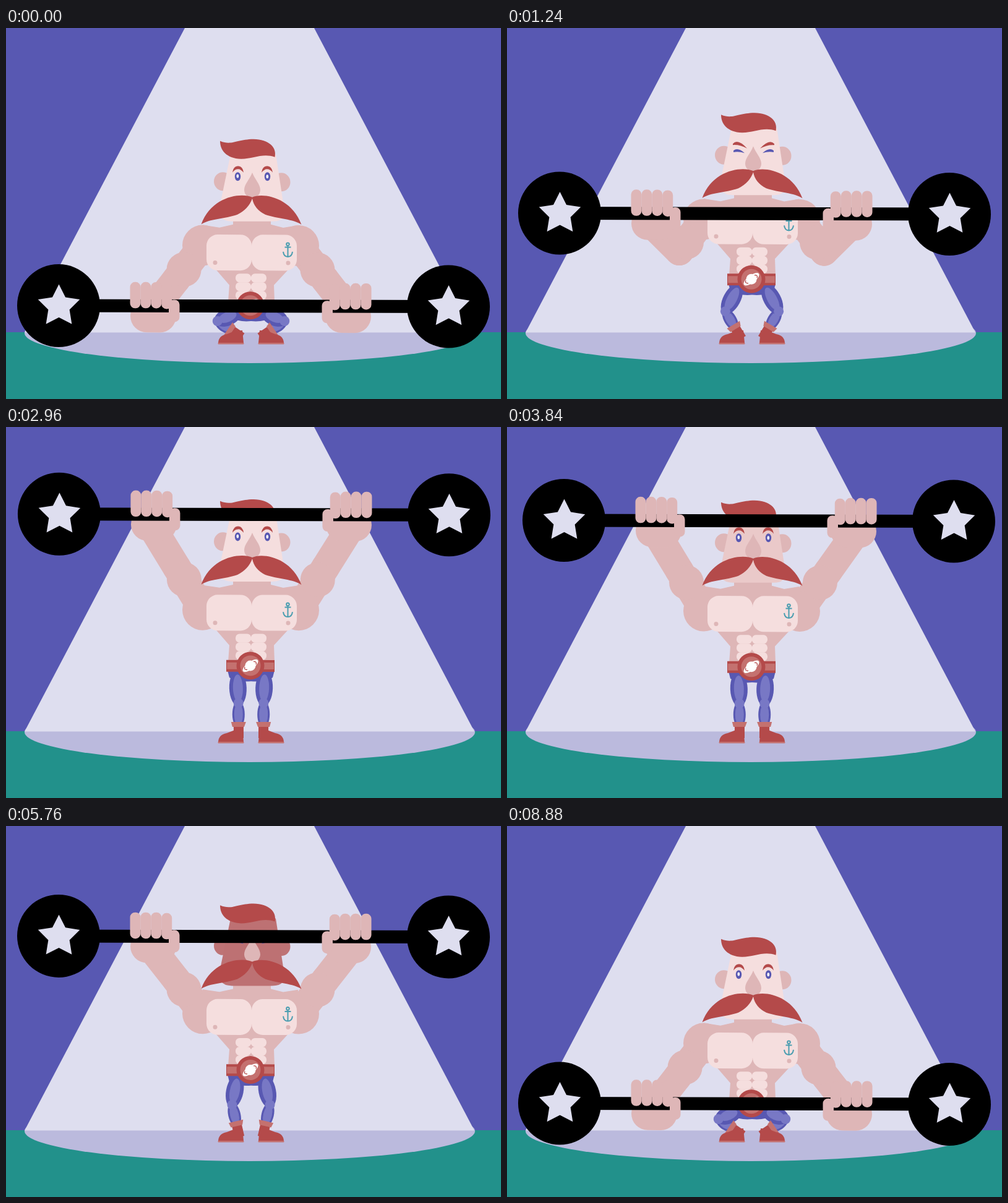
An HTML page with a canvas that plays this animation: 800 px wide and 600 px high, repeating every 9080 ms.

```html
<!DOCTYPE html>
<html lang="en">
<head>
<meta charset="utf-8">
<title>Strongman</title>
<style>
html, body { margin: 0; width: 100%; height: 100%; overflow: hidden; background: #5858b2; }
canvas { display: block; }
</style>
</head>
<body>
<canvas id="stage" width="800" height="600"></canvas>
<script>
const c = document.getElementById('stage').getContext('2d');
const LOOP = 9080;
const SKIN = '#deb6b7', PALE = '#f5dede', RED = '#b44a4a', PINK = '#c4716f';
const BLUE = '#5858b2', SOFT_BLUE = '#7878c5', LIGHT = '#dedeef', TEAL = '#4a9db0';

// Keyframes: [time, value], eased between
const barKeys = [[80, 449], [860, 292], [1240, 299.5], [2120, 303], [2400, 310], [2740, 127],
  [2800, 128], [3100, 151], [3840, 151], [4600, 145], [5040, 151], [5560, 145], [5680, 145],
  [6080, 454], [6240, 446], [6400, 448.5]];
const bodyKeys = [[80, 0], [860, -46], [1240, -42.5], [2120, -33.5], [2400, -26], [2740, -63],
  [3840, -61], [5040, -58], [5560, -60], [5680, -60], [6120, 4], [6280, -2], [6400, 0]];
const swayKeys = [[2800, 0], [3500, 7], [3900, 7], [4600, 0]];
const faceKeys = [[3500, 0], [4700, 1], [6640, 1], [8880, 0]];
const earKeys = [[3840, 0], [6000, 1], [6640, 1], [8880, 0]];

function at(keys, t) {
  const i = keys.findIndex(k => k[0] > t);
  if (i < 0) return keys[keys.length - 1][1];
  if (i === 0) return keys[0][1];
  const [t0, a] = keys[i - 1], [t1, b] = keys[i];
  const u = (t - t0) / (t1 - t0);
  return a + (b - a) * u * u * (3 - 2 * u);
}

const clamp = (v, lo, hi) => Math.max(lo, Math.min(hi, v));
const blush = (rgb, k) => `rgb(${[189, 113, 115].map((v, i) => Math.round(rgb[i] + (v - rgb[i]) * k))})`;

function shape(d, fill) {
  c.fillStyle = fill;
  c.fill(new Path2D(d));
}

function oval(x, y, rx, ry, fill, angle = 0) {
  c.fillStyle = fill;
  c.beginPath();
  c.ellipse(x, y, rx, ry, angle, 0, Math.PI * 2);
  c.fill();
}

function box(x, y, w, h, r, fill) {
  c.fillStyle = fill;
  c.beginPath();
  c.roundRect(x, y, w, h, r);
  c.fill();
}

function limb(p, q, width, color) {
  c.strokeStyle = color;
  c.lineWidth = width;
  c.lineCap = 'round';
  c.beginPath();
  c.moveTo(p.x, p.y);
  c.lineTo(q.x, q.y);
  c.stroke();
}

// Draws on the left, then mirrored on the right
function both(axis, draw) {
  for (const side of [1, -1]) {
    c.save();
    if (side < 0) {
      c.translate(axis * 2, 0);
      c.scale(-1, 1);
    }
    draw(side);
    c.restore();
  }
}

function shifted(dy, draw) {
  c.save();
  c.translate(0, dy);
  draw();
  c.restore();
}

// Middle joint of a two-bone limb, stretched when out of reach
function joint(a, b, la, lb, bend) {
  const dx = b.x - a.x, dy = b.y - a.y, d = Math.hypot(dx, dy);
  const reach = Math.max(1, d / (la + lb));
  la *= reach;
  lb *= reach;
  const along = (la * la - lb * lb + d * d) / (2 * d);
  const out = bend * Math.sqrt(Math.max(0, la * la - along * along));
  return { x: a.x + (dx * along + dy * out) / d, y: a.y + (dy * along - dx * out) / d };
}

function muscle(p, q, width, color, inset) {
  const length = Math.hypot(q.x - p.x, q.y - p.y) / 2;
  oval((p.x + q.x) / 2, (p.y + q.y) / 2, length + inset, width, color, Math.atan2(q.y - p.y, q.x - p.x));
}

function scene() {
  c.fillStyle = BLUE;
  c.fillRect(0, 0, 800, 600);
  c.fillStyle = '#22918b';
  c.fillRect(0, 492, 800, 108);
  oval(394, 493.5, 364, 48.5, '#bbbadd');
  shape('M289 0H498L757 492.5H30Z', LIGHT);
}

function legs(body) {
  shifted(body, () => shape('M358 456H434L431 468Q416 476 396 474Q377 476 361 468Z', BLUE));
  both(396, () => {
    const hip = { x: 374, y: 461 + body };
    const knee = joint(hip, { x: 377, y: 485 }, 45, 36, -1);
    knee.y = Math.min(knee.y, 474);
    const lean = Math.atan2(knee.x - 376, 497 - knee.y);
    const ankle = { x: 376 + 14 * Math.sin(lean), y: 497 - 14 * Math.cos(lean) };
    muscle(knee, ankle, 10, BLUE, 4);
    muscle(knee, ankle, 7, SOFT_BLUE, 0);
    muscle(hip, knee, 14, BLUE, 5);
    muscle(hip, knee, 8, SOFT_BLUE, -2);
    oval(knee.x, knee.y, 8, 8, SOFT_BLUE);

    c.save();
    c.translate(376, 497);
    c.rotate(lean);
    shape('M-8 -14H8V6H-8Z', RED);
    shape('M-12 -20H12L9 -12H-10Z', PINK);
    c.restore();
    shape('M343 509Q344 497 357 495L370 490L382 489L384 509Z', RED);
    box(342.5, 509, 42, 2.5, 1, PINK);
  });
}

function arms(body, bar, sway) {
  both(395.5, side => {
    const level = 351 + body;
    const shoulder = { x: 318, y: level + clamp((level - bar) / 20, 0, 7) };
    const wrist = { x: 231 + side * sway, y: bar + 14 };
    const elbow = joint(shoulder, wrist, 65, 67, 1);
    limb(shoulder, elbow, 46, SKIN);
    limb(elbow, wrist, 46, SKIN);
    oval(shoulder.x, shoulder.y, 33, 33, SKIN);
    oval(shoulder.x + (elbow.x - shoulder.x) * .71, shoulder.y + (elbow.y - shoulder.y) * .71, 28, 28, SKIN);
    box(201 + side * sway, bar - 10, 74, 53, 28, SKIN);
  });
}

function torso() {
  shape('M367 300V317L345 322L318 318V370L340 391L361 415L359 442H434L433 415L455 391L472 370V318L448 322L428 317V300Z', SKIN);
  both(397, () => {
    box(324, 333.5, 73, 58, 18, PALE);
    oval(338, 379, 3.5, 3.5, SKIN);
  });
  both(396, () => {
    for (let i = 0; i < 3; i++) box(371, 396.5 + i * 14, 25.2, 14.3, 6.5, PALE);
  });
  c.strokeStyle = TEAL;
  c.lineWidth = 2;
  c.lineCap = 'butt';
  c.stroke(new Path2D('M455.5 351V370M450.5 353.5H460.5M448 361Q449 369 455.5 369Q462 369 463 361M457.8 348.8A2.3 2.3 0 1 1 453.2 348.8A2.3 2.3 0 1 1 457.8 348.8'));
}

function belt() {
  c.fillStyle = RED;
  c.fillRect(356, 439, 78, 19);
  c.fillStyle = PINK;
  c.fillRect(357, 443, 76, 11);
  oval(395, 448, 22.5, 22.5, RED);
  oval(395, 448, 16.5, 16.5, PINK);
  oval(395, 448, 15, 6, '#fff', -.65);
  oval(395, 448, 8.5, 8.5, '#fff');
  c.strokeStyle = RED;
  c.lineWidth = 1.3;
  c.stroke(new Path2D('M386 450Q384 455 390 454.5M400 441.5Q406 441 404 446'));
}

function head(face, ear, squint) {
  oval(350.5, 247.5, 14.5, 15, ear);
  oval(445, 248.5, 14.5, 15, ear);
  shape('M363 203L346 285Q340 312 365 312H430Q455 312 449 288L436 203Z', face);
  shape('M346 182C365 190 372 179.5 400 179C425 179.5 438 192 434.5 208C415 201 400 211 380 211C356 210 346 197 346 182Z', RED);

  both(398.5, () => {
    if (squint) {
      shape('M365 229Q373 220 388 236.5Q376 230 365 231Z', RED);
      shape('M366 240Q373 234 384 244Q375 241 366 242.5Z', BLUE);
    } else {
      shape('M366 233Q367 223 375 222.5Q383 223 384 233Q379 227 375 227.5Q370 227.5 366 233Z', RED);
      oval(374.5, 239.5, 4.7, 7, BLUE);
    }
  });
  if (!squint) {
    oval(374.3, 238.8, 1.8, 3, '#fff');
    oval(422.3, 239.5, 1.8, 3, '#fff');
  }
  shape('M398 233C402 244 411 252 411 261A13 13 0 0 1 385 261C385 252 394 244 398 233Z', SKIN);
  both(396.5, side => {
    const mid = side > 0 ? 398 : 395;
    shape(`M${mid} 273C379 265 332 272 315.5 317C328 308 354 308 374 301Q392 292 ${mid} 275Z`, RED);
  });
}

function barbell(bar, sway) {
  c.save();
  c.translate(sway, bar);
  c.fillStyle = '#000';
  c.fillRect(85, -10.5, 630, 21);
  for (const x of [85, 715]) {
    oval(x, 0, 67, 67, '#000');
    c.fillStyle = LIGHT;
    c.beginPath();
    for (let i = 0; i < 10; i++) {
      const r = i % 2 ? 18 : 35.5, a = i * Math.PI / 5;
      c.lineTo(x + .5 + r * Math.sin(a), 1 - r * Math.cos(a));
    }
    c.fill();
  }
  both(395.5, side => {
    const drop = side > 0 ? -.5 : .7;
    for (let i = 0; i < 4; i++) box(200.5 + i * 16.9, -38 + drop + (i === 3 ? 1 : 0), 17, 42.5, 8, SKIN);
    box(263, -9.5 + drop, 17.5, 36, 8, SKIN);
  });
  c.restore();
}

function draw(now) {
  const t = now % LOOP;
  const bar = at(barKeys, t), body = at(bodyKeys, t), sway = at(swayKeys, t);
  const squint = (t > 320 && t < 2800) || (t > 4200 && t < 5900);
  const face = blush([245, 222, 222], at(faceKeys, t));
  const ear = blush([222, 182, 183], at(earKeys, t));
  scene();
  legs(body);
  c.save();
  c.transform(1, .0024, 0, 1, 0, -.2); // slight lean to the right
  arms(body, bar, sway);
  shifted(body, () => {
    torso();
    belt();
    head(face, ear, squint);
  });
  barbell(bar, sway);
  c.restore();
}

const start = performance.now();
function tick() {
  draw(performance.now() - start);
  requestAnimationFrame(tick);
}
tick();
</script>
</body>
</html>
```
